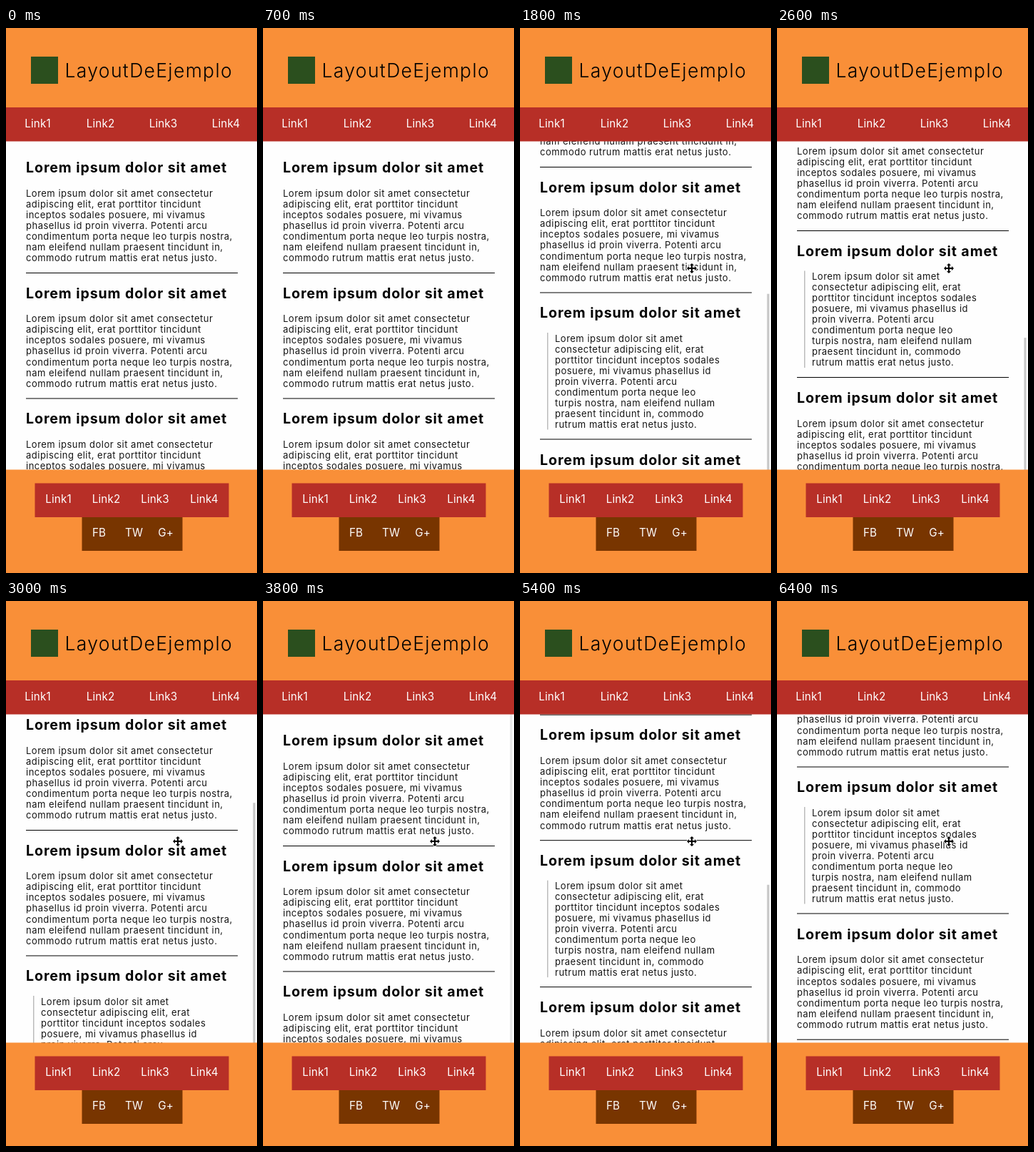
These frames come from a looping animation (352 by 762 pixels, 6500 ms). An HTML page:

```html
<!DOCTYPE html>
<html lang="es">
<head>
<meta charset="utf-8">
<title>LayoutDeEjemplo</title>
<style>
  html, body { margin: 0; width: 100%; height: 100%; overflow: hidden; background: #fefefe; }
  svg { display: block; width: 352px; height: 762px; font-family: Inter, "Open Sans", sans-serif; }
  .brand { font-size: 26.5px; font-weight: 300; letter-spacing: 1.35px; }
  .link { font-size: 15.2px; letter-spacing: .15px; fill: #fff; text-anchor: middle; }
  .title { font-size: 19.6px; font-weight: 700; letter-spacing: .9px; }
  .copy { font-size: 13px; letter-spacing: .49px; fill: #151515; }
</style>
</head>
<body>
<svg viewBox="0 0 352 762">
  <rect width="352" height="762" fill="#fefefe"/>
  <g id="page"></g>
  <rect id="bar" x="346.5" width="3" height="480" fill="#c6c6c6"/>
  <path id="cursor" transform="translate(241 336)" stroke="#fff" stroke-width="1.6" paint-order="stroke"
    d="M0-7 3-4H1V-1H4V-3L7 0 4 3V1H1V4H3L0 7-3 4H-1V1H-4V3L-7 0-4-3V-1H-1V-4H-3Z"/>
  <g id="shell">
    <rect width="352" height="111" fill="#f98f38"/>
    <rect x="35" y="40" width="38" height="38" fill="#2b4f1e"/>
    <text class="brand" x="82.5" y="69">LayoutDeEjemplo</text>
    <rect y="111" width="352" height="47.5" fill="#b72f27"/>
    <rect y="617.5" width="352" height="144.5" fill="#f98f38"/>
    <rect x="40.5" y="636.5" width="272" height="47.5" fill="#b72f27"/>
    <rect x="106.5" y="684" width="141" height="47" fill="#783500"/>
  </g>
</svg>
<script>
const LOOP = 6500, STEP = 100;
const TITLE = "Lorem ipsum dolor sit amet";
const PLAIN = [
  "Lorem ipsum dolor sit amet consectetur",
  "adipiscing elit, erat porttitor tincidunt",
  "inceptos sodales posuere, mi vivamus",
  "phasellus id proin viverra. Potenti arcu",
  "condimentum porta neque leo turpis nostra,",
  "nam eleifend nullam praesent tincidunt in,",
  "commodo rutrum mattis erat netus justo."
];
const QUOTE = [
  "Lorem ipsum dolor sit amet",
  "consectetur adipiscing elit, erat",
  "porttitor tincidunt inceptos sodales",
  "posuere, mi vivamus phasellus id",
  "proin viverra. Potenti arcu",
  "condimentum porta neque leo",
  "turpis nostra, nam eleifend nullam",
  "praesent tincidunt in, commodo",
  "rutrum mattis erat netus justo."
];

const byId = id => document.getElementById(id);
const page = byId("page"), bar = byId("bar"), cursor = byId("cursor"), shell = byId("shell");

function add(box, tag, attrs, text = "") {
  const el = document.createElementNS("http://www.w3.org/2000/svg", tag);
  for (const key in attrs) el.setAttribute(key, attrs[key]);
  el.textContent = text;
  box.append(el);
}

// y is the optical centre of the heading; returns that of the next one
function article(y, lines, quoted) {
  const x = quoted ? 49 : 28;
  const pitch = quoted ? 15.05 : 15.15;
  add(page, "text", { class: "title", x: 28, y: y + 7 }, TITLE);
  lines.forEach((line, i) =>
    add(page, "text", { class: "copy", x, y: y + 40.5 + i * pitch }, line));
  if (quoted) add(page, "rect", { x: 38, y: y + 28, width: 1.5, height: 135.5, fill: "#bbb" });
  add(page, "rect", { x: 28, y: y + (quoted ? 176.5 : 147), width: 297, height: 1 });
  return y + (quoted ? 205.7 : 175.5);
}

function build() {
  let y = 195;
  for (let i = 0; i < 5; i++) y = article(y, i === 3 ? QUOTE : PLAIN, i === 3);

  const label = (text, x, y) => add(shell, "text", { class: "link", x, y }, text);
  [44.5, 132.5, 220.5, 308.5].forEach((x, i) => label("Link" + (i + 1), x, 138.5));
  [73.5, 140.5, 209, 278].forEach((x, i) => label("Link" + (i + 1), x, 664));
  label("FB", 130.5, 711);
  label("TW", 179.5, 711);
  label("G+", 224, 711);
}

// [time, value] pairs
const END = 461.5;
const SCROLL = [
  [0, 0], [1000, 0], [1100, 6], [1300, 75], [1800, 323.5], [2100, END],
  [2400, END], [2600, 410], [3000, 197.5], [3350, 0],
  [4500, 0], [4700, 35], [5000, 153.5], [5600, END], [LOOP, END]
];
const BAR = [
  [0, 0], [1000, 0], [1100, 1], [3500, 1], [4000, 0],
  [4500, 0], [4600, 1], [5750, 1], [6400, 0], [LOOP, 0]
];

function at(keys, t) {
  const i = keys.findIndex(key => key[0] > t);
  const [t0, v0] = keys[i - 1], [t1, v1] = keys[i];
  return v0 + (v1 - v0) * (t - t0) / (t1 - t0);
}

function draw(now) {
  const t = Math.floor(now % LOOP / STEP) * STEP;
  const scroll = at(SCROLL, t);
  page.setAttribute("transform", `translate(0 ${-scroll})`);
  bar.setAttribute("y", 142 + .71 * scroll);
  bar.setAttribute("opacity", at(BAR, t));
  cursor.setAttribute("visibility", t < 800 ? "hidden" : "visible");
}

build();
const start = performance.now();
function tick() {
  draw(Math.max(0, performance.now() - start));
  requestAnimationFrame(tick);
}
tick();
</script>
</body>
</html>
```
